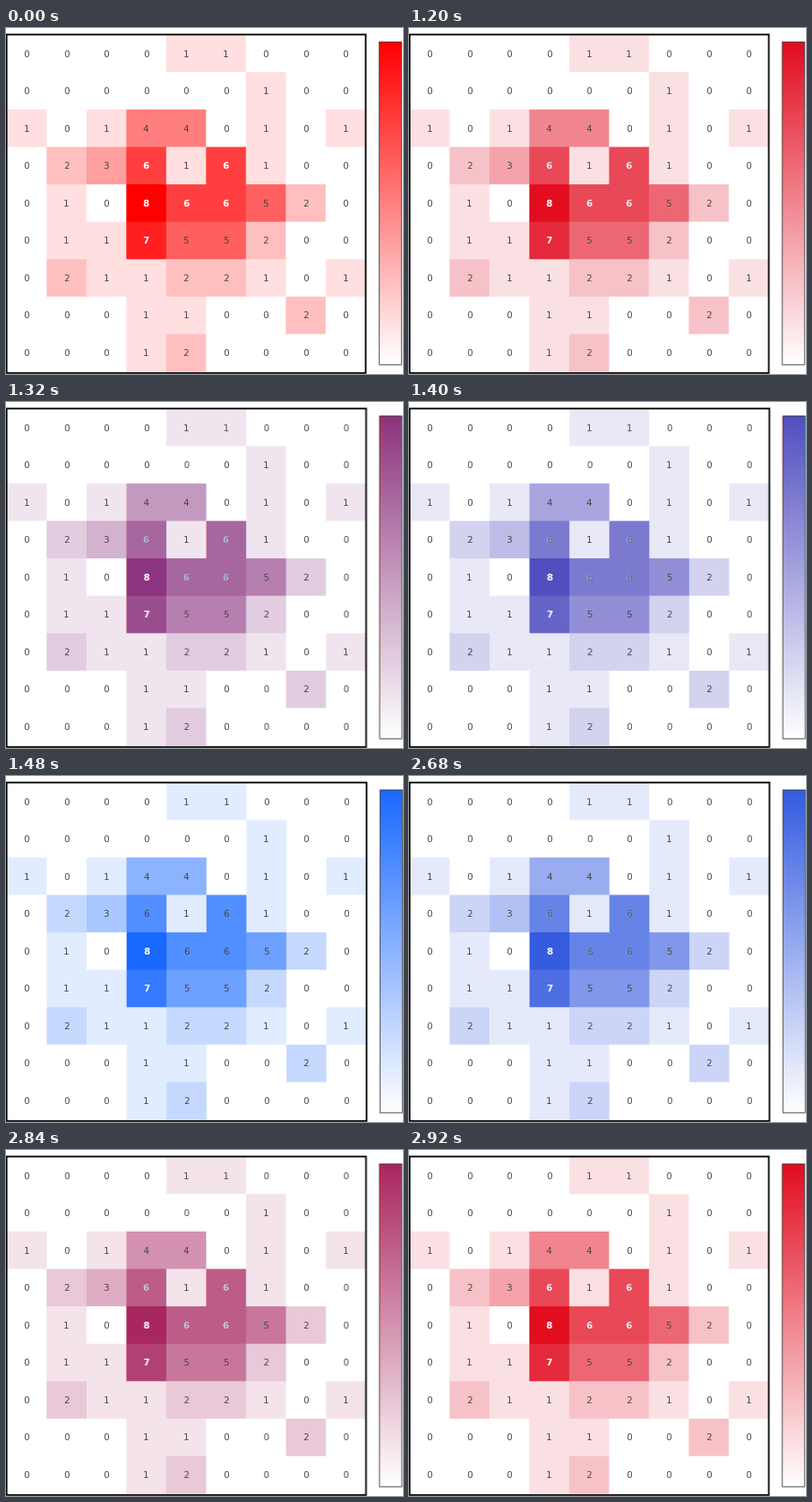
Animation of 463x403 px, one loop 2.96 s. Source, as a matplotlib script:

```python
import numpy as np
import matplotlib.pyplot as plt
from matplotlib.animation import FuncAnimation
from matplotlib.colors import LinearSegmentedColormap
from matplotlib.patches import Rectangle

W, H, DPI = 463, 403, 100
STEP = 40
FRAMES = 74
HOLD = 30      # frames each heatmap stays still
FADE = 8       # steps in one crossfade
PX = 72 / DPI  # one pixel in points

ROWS = ["000011000", "000000100", "101440101",
        "023616100", "010866520", "011755200",
        "021122101", "000110020", "000120000"]
COUNTS = np.array([[int(c) for c in row] for row in ROWS])
DARK = "#444444"

fig = plt.figure(figsize=(W / DPI, H / DPI), dpi=DPI, facecolor="white")
ax = fig.add_axes([0, 0, 1, 1])


def reset_axes():
    ax.clear()
    ax.set_xlim(0, W)
    ax.set_ylim(H, 0)
    ax.axis("off")


def outline(x0, y0, x1, y1, color, width):
    ax.add_patch(Rectangle((x0, y0), x1 - x0, y1 - y0, fill=False, ec=color,
                           lw=width * PX, snap=False, joinstyle="miter"))


def coverage(start, size, pixels):
    """Share of each pixel that each of the nine cells covers."""
    p = np.arange(pixels)[:, None]
    lo = start + size * np.arange(9)
    return np.clip(np.minimum(p + 1, lo + size) - np.maximum(p, lo), 0, 1)


def heatmap(top, cell_w, right, bar_x, white_from):
    """Draw one heatmap with its colour bar and return it as pixels."""
    reset_axes()
    cmap = LinearSegmentedColormap.from_list("heat", ["white", top])
    field = coverage(7.7, 43.6, H) @ COUNTS @ coverage(0.8, cell_w, W).T
    ax.imshow(field, cmap=cmap, vmin=0, vmax=8, aspect="auto",
              extent=(0, W, H, 0), interpolation="nearest")

    for (r, c), n in np.ndenumerate(COUNTS):
        light = n >= white_from
        ax.text(0.5 + cell_w * (c + 0.5), 30.9 + 43.5 * r, str(n),
                family="DejaVu Sans", size=10.6 * PX,
                color="white" if light else DARK,
                weight="bold" if light else "normal",
                ha="center", va="center")
    outline(0.7, 7.6, right, 401.8, "black", 1.9)

    ramp = np.linspace(1, 0, 376)[:, None]
    ax.imshow(ramp, cmap=cmap, vmin=0, vmax=1, aspect="auto",
              extent=(bar_x, bar_x + 26, 392, 16), interpolation="nearest")
    outline(bar_x + 0.2, 16.2, bar_x + 26.3, 392.2, DARK, 1)

    ax.set_xlim(0, W)
    ax.set_ylim(H, 0)
    fig.canvas.draw()
    return np.array(fig.canvas.buffer_rgba())[..., :3] / 255


red = heatmap("#ff0000", 46.5, 419.5, 435, white_from=6)
blue = heatmap("#1969ff", 46.6, 420.5, 436, white_from=7)

reset_axes()
view = ax.imshow(red, extent=(0, W, H, 0), aspect="auto",
                 interpolation="nearest")


def blue_share(i):
    """Share of the blue heatmap in the mix at frame i."""
    if i < HOLD + FADE - 1:
        return max(0, i - HOLD + 1) / FADE
    back = i - (2 * HOLD + FADE - 1) + 1
    return 1 - max(0, back) / FADE


def update(i):
    t = blue_share(i)
    view.set_data((1 - t) * red + t * blue)
    return [view]


anim = FuncAnimation(fig, update, frames=FRAMES, interval=STEP,
                     repeat=True, repeat_delay=0)
plt.show()
```
